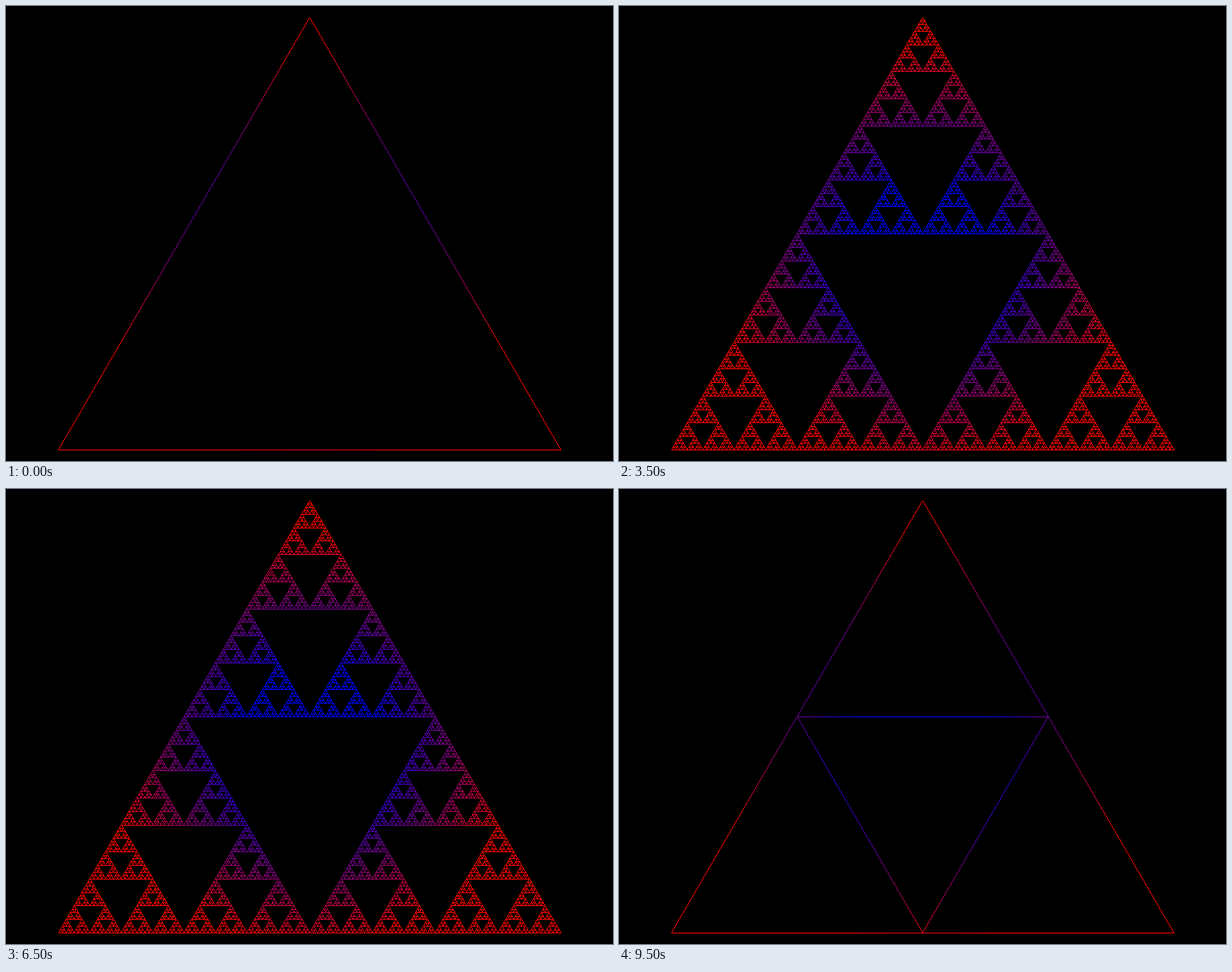
These frames come from a looping animation (800 by 600 pixels, 10000 ms). An HTML page with a canvas:

```html
<!DOCTYPE html>
<html>
<head>
<meta charset="utf-8">
<title>Fractal triangle</title>
<style>
  html, body { margin: 0; height: 100%; overflow: hidden; background: #000; }
  canvas { display: block; }
</style>
</head>
<body>
<canvas id="stage" width="800" height="600"></canvas>
<script>
const W = 800, H = 600, STEP = 500, MAX_DEPTH = 10;
const GLOW = { x: 400, y: 328, inner: 93, outer: 273 };
const ctx = document.getElementById('stage').getContext('2d');
const image = ctx.createImageData(W, H);
const pixels = new Uint32Array(image.data.buffer);
const BLACK = 0xff000000;

// Radial blend from blue to red, packed as ABGR
const shades = new Uint32Array(W * H);
for (let y = 0; y < H; y++) {
  for (let x = 0; x < W; x++) {
    const r = Math.hypot(x - GLOW.x, y - GLOW.y);
    const k = Math.min(1, Math.max(0, (r - GLOW.inner) / (GLOW.outer - GLOW.inner)));
    const red = Math.round(255 * k);
    shades[y * W + x] = BLACK + (255 - red) * 65536 + red;
  }
}

function plot(x, y) {
  const p = y * W + x;
  pixels[p] = shades[p];
}

// Hard-edged side from a down to b; the ends stay fractional so that
// short sides fall on the same pixels as the long side they belong to
function side(a, b) {
  const slope = (b[0] - a[0]) / (b[1] - a[1]);
  const snap = slope < 0 ? Math.floor : Math.round;
  const end = Math.round(b[1]);
  for (let y = Math.round(a[1]); y <= end; y++) plot(snap(a[0] + (y - a[1]) * slope), y);
}

function base(a, b) {
  const y = Math.round(a[1]), end = Math.round(b[0]);
  for (let x = Math.round(a[0]); x <= end; x++) plot(x, y);
}

const mid = (a, b) => [(a[0] + b[0]) / 2, (a[1] + b[1]) / 2];

function triangle(top, left, right, depth) {
  if (depth === 0) {
    side(top, left);
    side(top, right);
    base(left, right);
    return;
  }
  const l = mid(top, left), r = mid(top, right), b = mid(left, right);
  triangle(top, l, r, depth - 1);
  triangle(l, left, b, depth - 1);
  triangle(r, b, right, depth - 1);
}

let shown = -1;
function draw() {
  const step = Math.floor(performance.now() / STEP) % (2 * MAX_DEPTH);
  const depth = MAX_DEPTH - Math.abs(MAX_DEPTH - step);
  if (depth !== shown) {
    shown = depth;
    pixels.fill(BLACK);
    triangle([400, 15], [69, 585], [731, 585], depth);
    ctx.putImageData(image, 0, 0);
  }
  requestAnimationFrame(draw);
}
draw();
</script>
</body>
</html>
```
